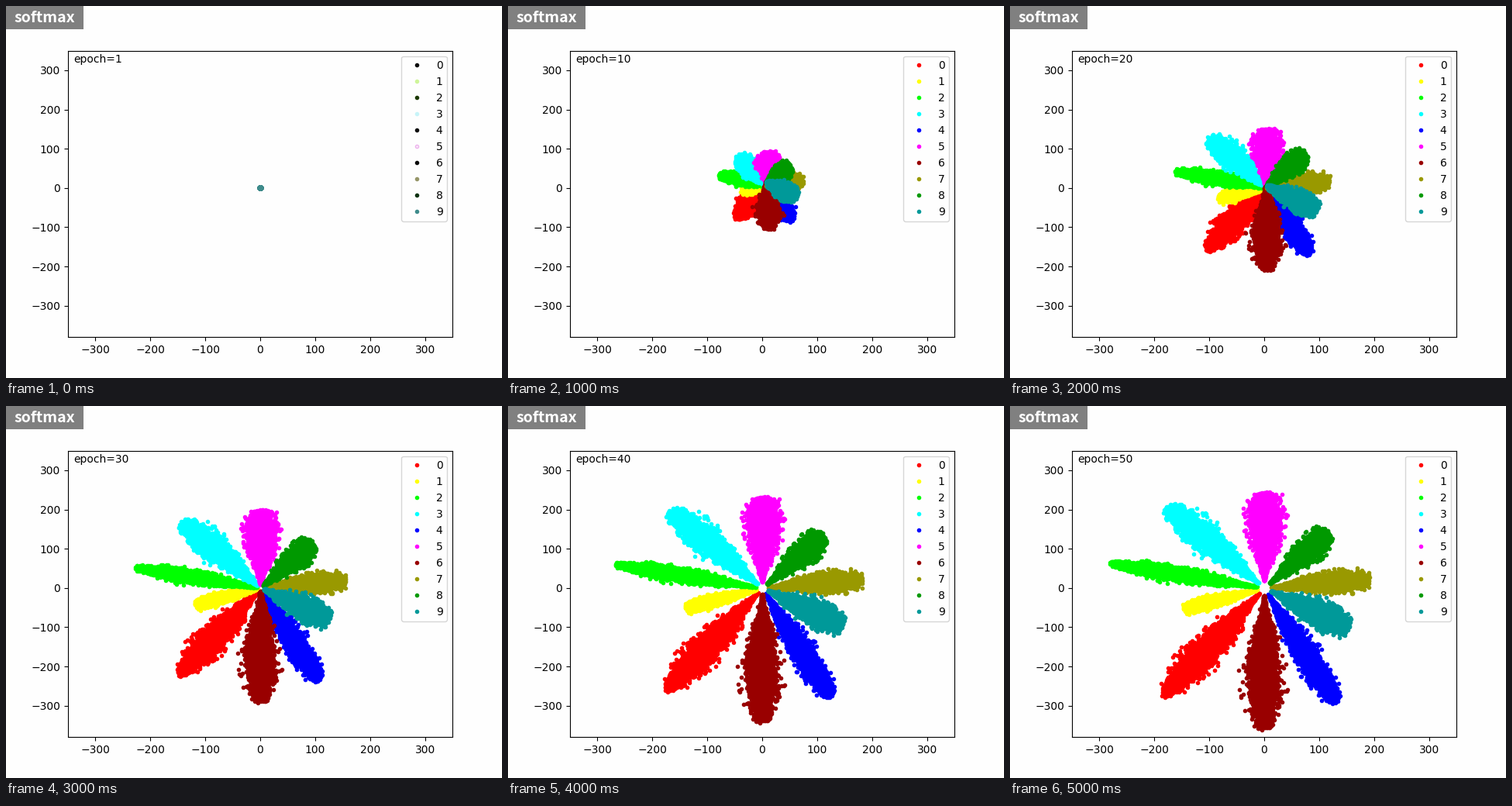
These frames come from a looping animation (640 by 480 pixels, 6 s). A matplotlib script:

```python
from colorsys import hsv_to_rgb

import numpy as np
import matplotlib.pyplot as plt
from matplotlib.animation import FuncAnimation
from matplotlib.patches import Rectangle

W, H, DPI = 640, 480, 100
STEPS = 6
POINTS = 5500
UNIT_X, UNIT_Y = 700 / 496, 730 / 369.6    # data units per pixel
PAPER = "#fefefe"

# fully grown petals: tip as a pixel offset (y upwards), half width
PETALS = [(-131 - 139j, 20), (-106 - 27j, 9.5), (-200 + 32j, 11.5),
          (-126 + 106j, 19), (93 - 149j, 17), (1 + 126j, 22),
          (-2 - 183j, 23), (137 + 12j, 14), (85 + 73j, 15.5),
          (111 - 52j, 18)]

COLORS = [hsv_to_rgb(i % 6 / 6, 1, 1 if i < 6 else .6) for i in range(10)]

# muted faces and edges, used while all points still sit at the origin
DIM = ["#0a0a0a", "#cff59a", "#1c3a00", "#c8f4f8", "#0a0a0a",
       "#fbe9fb", "#0a0a0a", "#969669", "#0a320f", "#3f8c8c"]
DIM_EDGES = DIM[:5] + ["#edb4ed"] + DIM[6:]


def cloud(i, step):
    """Points of one class as complex pixel offsets from the origin."""
    tip, width = PETALS[i]
    length = abs(tip)
    rng = np.random.default_rng(i)
    s = rng.beta(1.5, 1.4, POINTS) + rng.normal(0, .012, POINTS)
    s = s.clip(0, 1.05)
    across = rng.standard_t(15, POINTS).clip(-4, 4)
    fuzz = rng.normal(0, 1, (2, POINTS)).clip(-2, 2)

    grow = np.sin(np.pi / 2 * step / (STEPS - 1))
    gap = 10 * grow ** 3
    along = gap + s * ((length - 3) * grow - gap)
    # short petals end blunt, long ones taper off
    taper = .46 + .0022 * length
    sigma = (width - 2.5) / 2.6 * np.sqrt(grow)
    side = sigma * across * np.sin(np.pi * taper * s ** 1.15)
    blur = .3 + 12 * grow * (1 - grow) ** 2
    drift = (78 + 58j) * grow * (1 - grow) ** 3
    return ((along + 1j * side) * tip / length
            + blur * (fuzz[0] + 1j * fuzz[1]) + drift)


fig, ax = plt.subplots(figsize=(W / DPI, H / DPI), dpi=DPI)
fig.set_facecolor(PAPER)
ax.set_facecolor(PAPER)
fig.subplots_adjust(left=.125, right=.9, bottom=.11, top=.88)
ax.set(xlim=(-350, 350), ylim=(-380, 350))

lines = [ax.plot([], [], ".", label=str(i))[0] for i in range(len(PETALS))]
keys = ax.legend(loc="upper right").legend_handles
label = ax.text(-340, 320, "")

fig.add_artist(Rectangle((0, 1 - 30 / H), 100 / W, 30 / H, color="#808080",
                         linewidth=0, transform=fig.transFigure))
fig.text(10 / W, 1 - 21 / H, "softmax", color="white", fontsize=14.05,
         family="Noto Sans CJK JP", weight="bold")


def draw(step):
    faces, edges = (COLORS, COLORS) if step else (DIM, DIM_EDGES)
    for i, (line, key) in enumerate(zip(lines, keys)):
        pts = cloud(i, step)
        line.set_data(pts.real * UNIT_X, pts.imag * UNIT_Y)
        for mark in (line, key):
            mark.set_markerfacecolor(faces[i])
            mark.set_markeredgecolor(edges[i])
    label.set_text(f"epoch={max(1, 10 * step)}")
    return lines + [label]


def reset():
    return draw(0)


anim = FuncAnimation(fig, draw, frames=STEPS, init_func=reset, interval=1000,
                     repeat=True, repeat_delay=0, blit=False)
plt.show()
```
